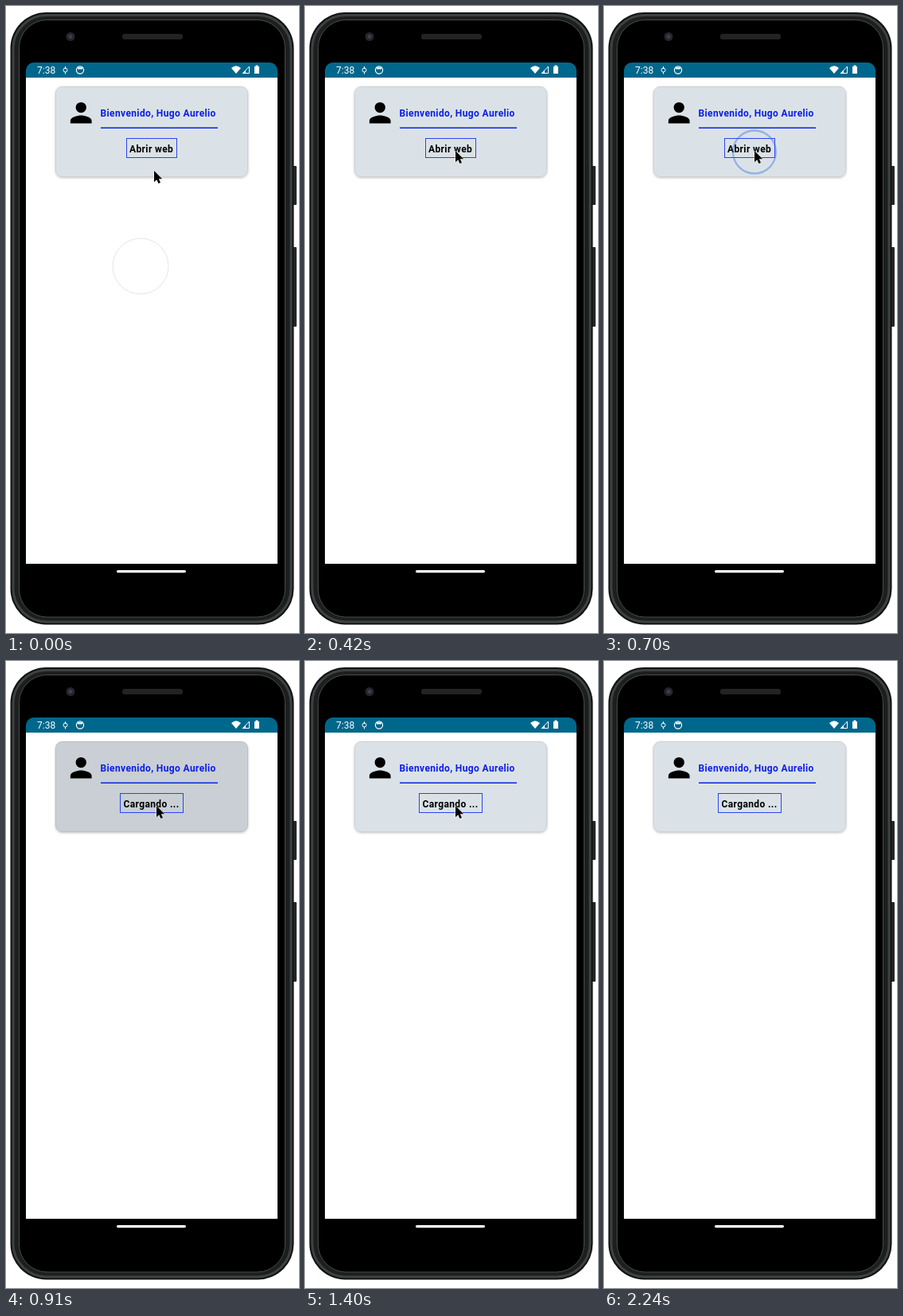
Write an HTML page that moves like this. It is 368x788 px and loops after 2.66 s.

```html
<!DOCTYPE html>
<html lang="es">
<head>
<meta charset="utf-8">
<title>Bienvenida</title>
<style>
  html, body { margin: 0; width: 100%; height: 100%; overflow: hidden; background: #fff; }
  svg { display: block; width: 368px; height: 788px; }
  text { font: 700 12px Roboto, sans-serif; letter-spacing: .37px; }
  .clock { font-weight: 400; letter-spacing: 0; fill: #fff; }
  .frame { fill: none; stroke: #2b45ee; }
  .cursor, .idle, .busy, .press, .ring, .echo {
    animation: 2660ms linear infinite;
  }
  .cursor { animation-name: cursor; }
  .idle, .busy, .echo { animation-timing-function: step-end; }
  .idle { animation-name: idle; }
  .busy { animation-name: busy; }
  .echo { animation-name: echo; }
  .press { animation-name: press; }
  .ring { animation-name: ring; }

  /* One tick is 70 ms, 1/38 of the loop. */
  @keyframes cursor {
    0% { transform: translate(186px, 207px); opacity: 1; animation-timing-function: steps(3); }
    7.89% { transform: translate(189px, 186px); animation-timing-function: steps(2); }
    13.15% { transform: translate(189px, 182px); }
    63.15% { transform: translate(189px, 182px); animation-timing-function: steps(2); }
    68.42% { transform: translate(215px, 290px); opacity: 1; animation-timing-function: step-end; }
    71.05%, 100% { transform: translate(215px, 290px); opacity: 0; }
  }
  @keyframes idle { 0% { opacity: 1; } 28.94%, 100% { opacity: 0; } }
  @keyframes busy { 0% { opacity: 0; } 28.94%, 100% { opacity: 1; } }
  @keyframes echo { 0% { opacity: 1; } 2.63%, 100% { opacity: 0; } }
  @keyframes press {
    0% { opacity: 0; }
    26.31% { opacity: 0; animation-timing-function: steps(2); }
    31.57% { opacity: .08; }
    34.21% { opacity: .08; animation-timing-function: steps(4); }
    44.73%, 100% { opacity: 0; }
  }
  @keyframes ring {
    0% { r: 18px; stroke-width: 3px; opacity: 0; animation-timing-function: step-end; }
    21.05% { r: 18px; stroke-width: 3px; opacity: .55; animation-timing-function: step-end; }
    23.68% { r: 23px; stroke-width: 3px; opacity: .5; animation-timing-function: steps(3); }
    31.57% { r: 35px; stroke-width: 1px; opacity: .12; animation-timing-function: step-end; }
    34.21%, 100% { r: 35px; stroke-width: 1px; opacity: 0; }
  }
</style>
</head>
<body>
<svg viewBox="0 0 368 788">
  <defs>
    <filter id="soft" x="-10%" y="-10%" width="120%" height="120%">
      <feDropShadow dx="0" dy="1" stdDeviation="1.6" flood-color="#000" flood-opacity=".25"/>
    </filter>
  </defs>

  <!-- Phone -->
  <g>
    <rect x="359" y="201" width="6" height="49" rx="1" fill="#252728"/>
    <rect x="359" y="303" width="6" height="100" rx="1" fill="#252728"/>
    <rect x="5.5" y="8" width="356" height="769.5" rx="45" fill="#111313"/>
    <rect x="9" y="11.5" width="349" height="762.5" rx="42" fill="#1d1f1f" stroke="#3e4141" stroke-width="3"/>
    <rect x="16.5" y="17.5" width="334" height="750.5" rx="35" fill="#000" stroke="#484b4b"/>
    <rect x="146" y="35" width="76" height="7" rx="3" fill="#232323"/>
    <circle cx="81" cy="38.5" r="5.5" fill="#25252a"/>
    <circle cx="81" cy="38.5" r="2.5" fill="#3d3d4c"/>
    <rect x="139" y="709" width="87" height="3.2" rx="1.6" fill="#fff"/>
  </g>

  <!-- Screen and status bar -->
  <path d="M25 90H341V701H25Z" fill="#fff"/>
  <path d="M25 90V81a10 10 0 0 1 10-10H331a10 10 0 0 1 10 10V90Z" fill="#00678c"/>
  <text class="clock" x="39" y="85">7:38</text>
  <g fill="none" stroke="#fff">
    <path d="M74.5 76v3M72 80.5a2.5 2.5 0 1 0 5 0a2.5 2.5 0 1 0-5 0M74.5 83v2.5"/>
    <circle cx="93" cy="80.5" r="4.6" stroke-width="1.2"/>
    <path d="M90 78.3h6" stroke-width="2.2"/>
    <path d="M297.5 84.5h8v-8.5Z"/>
  </g>
  <g fill="#fff">
    <path d="M283 78q6-5.5 12 0l-6 7Z"/>
    <path d="M301 80.5v4.5h-4.5Z"/>
    <path d="M312 76h1.5v-1.5h3V76h1.5v9h-6Z"/>
  </g>

  <!-- Card -->
  <rect x="62.5" y="101.5" width="241" height="113" rx="8" fill="#dbe2e7" stroke="#cbd1d6" filter="url(#soft)"/>
  <rect class="press" x="62" y="101" width="242" height="114" rx="8.5"/>
  <path transform="translate(74.2 114.2) scale(1.67)"
    d="M12 12a4 4 0 1 0 0-8a4 4 0 0 0 0 8zm0 2c-2.67 0-8 1.34-8 4v2h16v-2c0-2.66-5.33-4-8-4z"/>
  <text x="118.5" y="139" fill="#0b1ee8">Bienvenido, Hugo Aurelio</text>
  <rect x="119" y="152.4" width="147" height="1.6" fill="#1230e0"/>
  <g class="idle">
    <rect class="frame" x="151.5" y="166.5" width="63" height="24"/>
    <text x="155" y="183.5">Abrir web</text>
  </g>
  <g class="busy">
    <rect class="frame" x="143.5" y="166.5" width="79" height="24"/>
    <text x="147.5" y="183.5">Cargando ...</text>
  </g>

  <!-- Pointer -->
  <circle class="echo" cx="169" cy="327" r="35" fill="none" stroke="#e2e2f6"/>
  <circle class="ring" cx="189" cy="183.5" r="18" fill="none" stroke="#1f66e0"/>
  <path class="cursor" d="M0 0V14.2L3.3 11.2L5.4 16L8 14.9L5.9 10.2H10.2Z"
    stroke="#fff" stroke-linejoin="round" paint-order="stroke"/>
</svg>
</body>
</html>
```
